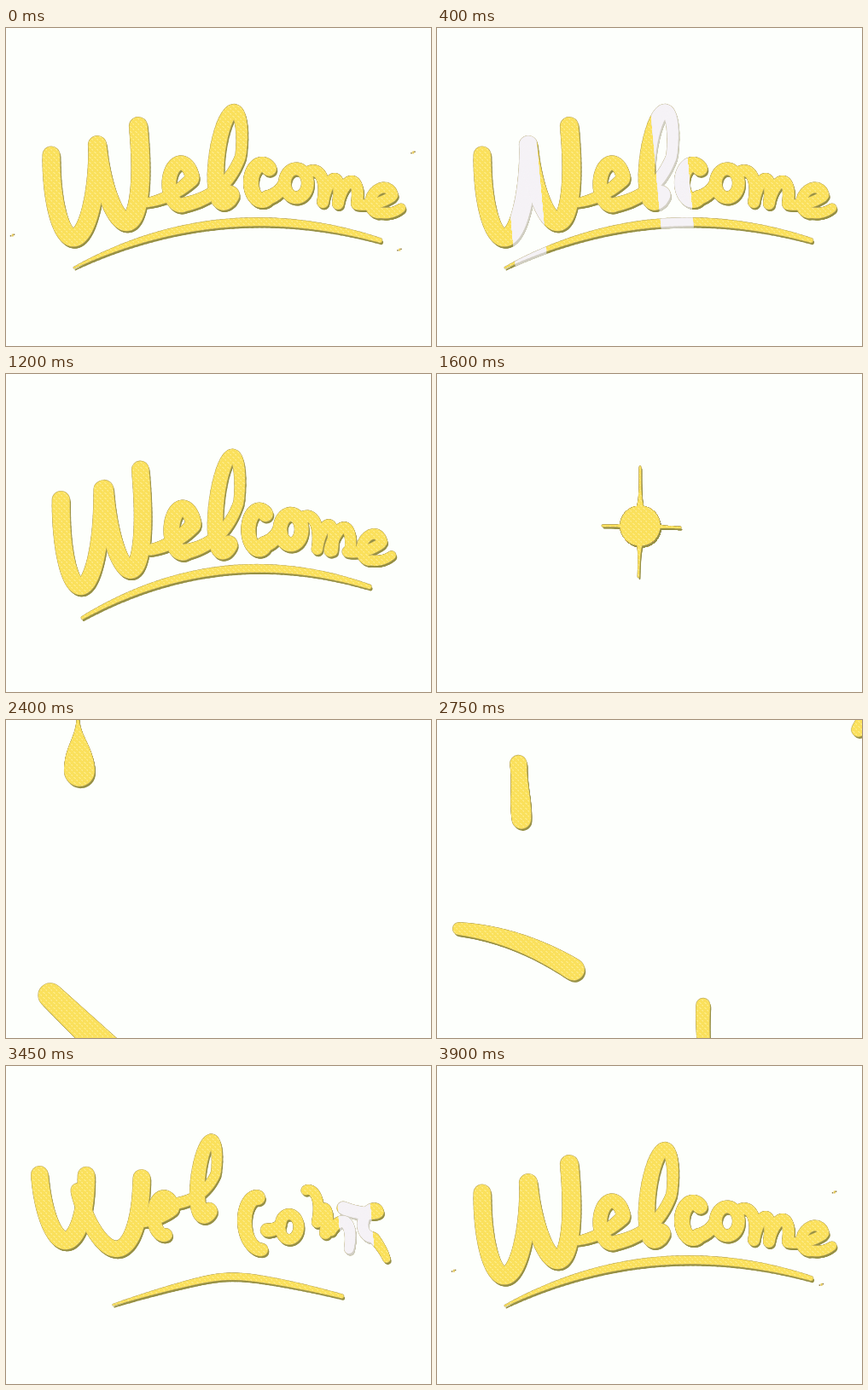
An HTML page with a canvas that plays this animation: 498x373 px, repeating every 3950 ms.

```html
<!DOCTYPE html>
<html lang="en">
<head>
<meta charset="utf-8">
<title>Welcome</title>
<style>
  html, body { margin: 0; width: 100%; height: 100%; overflow: hidden; background: #fdfffc; }
  canvas { display: block; }
</style>
</head>
<body>
<canvas id="stage" width="498" height="373" role="img" aria-label="Welcome"></canvas>
<script>
const LOOP = 3950, SAMPLES = 64, CENTER = { x: 249, y: 186 };
const ctx = document.getElementById('stage').getContext('2d');
ctx.lineCap = 'round';

const lerp = (a, b, k) => a + (b - a) * k;
const linear = k => k;
const smooth = k => k * k * (3 - 2 * k);
const easeOut = k => 1 - (1 - k) ** 2;
const backIn = k => k * k * (3.6 * k - 2.6);
const random = n => Math.abs(Math.sin(n * 127.1) * 43758.5) % 1;

// A brush maps u in 0..1 to [x, y, radius].
function swoosh(x1, y1, x2, y2, sag, r1, r2, belly = 0) {
  const dx = x2 - x1, dy = y2 - y1, length = Math.hypot(dx, dy);
  return u => {
    const bow = 4 * u * (1 - u);
    return [x1 + dx * u + dy / length * sag * bow,
            y1 + dy * u - dx / length * sag * bow,
            lerp(r1, r2, u) + belly * bow];
  };
}

// A U shape; negative depth makes an arch.
const cup = (x1, y1, x2, y2, depth, lean, r) => u => {
  const bow = Math.sin(Math.PI * u);
  return [lerp(x1, x2, smooth(u)) + lean * bow, lerp(y1, y2, u) + depth * bow ** .9, r];
};

// Part of a slanted ellipse, angles in degrees.
const bowl = (cx, cy, rx, ry, from, turn, r1, r2 = r1, slant = 0) => u => {
  const a = (from + turn * u) * Math.PI / 180, y = ry * Math.sin(a);
  return [cx + rx * Math.cos(a) - slant * y, cy + y, lerp(r1, r2, u)];
};

const join = (...parts) => u => {
  const i = Math.min(parts.length - 1, Math.floor(u * parts.length));
  return parts[i](u * parts.length - i);
};

// A bowl entered by a connecting stroke from (x, y).
function linked(x, y, sag, r, shape) {
  const [x2, y2, r2] = shape(0);
  return join(swoosh(x, y, x2, y2, sag, r, r2), shape);
}

const shift = (brush, dx, dy) => u => {
  const [x, y, r] = brush(u);
  return [x + dx, y + dy, r];
};
const ball = (x, y) => () => [x, y, 23];
const ray = (dx, dy) => u => [238 + dx * u, 178 + dy * u, .8 + 12 * (1 - u) ** 4];
const star = { body: ball(238, 178), up: ray(0, -69), down: ray(-2, 60), left: ray(-44, 0), right: ray(47, 2) };
const drop = u => [84 + 2 * u, -3 + 63 * u, 1 + 16.5 * smooth(u)];
const capsule = swoosh(52, 323, 145, 412, 0, 14, 18);

// Each stroke: its place in the word, its part of the star, its loose shape.
const strokes = [
  { // W, left half
    word: cup(53, 149, 107, 137, 103, 0, 10),
    part: star.left,
    loose: swoosh(-10, 49, 47, 96, 22, 9, 9, 1)
  },
  { // W, right half
    word: cup(107, 137, 155, 115, 101, 12, 10.5),
    part: star.left,
    loose: swoosh(3, 178, 173, 191, 16, 1, 8),
    early: capsule
  },
  { // e
    word: linked(164, 205, -5, 5, bowl(205, 183, 14, 25, -15, -270, 8)),
    part: star.body,
    loose: swoosh(105, 97, 110, 165, 0, 17, 5),
    early: drop
  },
  { // l
    word: linked(209, 207, -12, 8, bowl(261, 150, 14, 53, 0, -300, 6, 11, .12)),
    part: star.up,
    loose: swoosh(133, 0, 148, 77, 0, .8, 6)
  },
  { // c
    word: bowl(300, 181, 13, 21, -50, -250, 8.5),
    part: star.up,
    loose: swoosh(247, 116, 275, 274, -9, 8, 2.5, .8)
  },
  { // o
    word: linked(306, 199, -3, 8, bowl(340, 182, 13.5, 17, 180, 360, 7)),
    part: star.body,
    loose: swoosh(305, 169, 305, 227, 0, 6, .8)
  },
  { // m, first arches
    word: join(cup(352, 172, 371, 206, -18, 6, 6.5), cup(371, 206, 389, 206, -29, 5, 6.5)),
    part: star.right,
    loose: swoosh(348, 52, 321, 160, 6, .5, 8)
  },
  { // m, last arch
    word: cup(389, 206, 411, 206, -26, 5, 6.5),
    part: star.right,
    loose: swoosh(353, 150, 369, 246, 11, 1, .8, 5)
  },
  { // final e
    word: join(linked(411, 207, -4, 6, bowl(440, 202, 13, 15, -20, -270, 6, 6, .2)), swoosh(442, 217, 463, 211, -2, 6, 5)),
    part: star.right,
    loose: swoosh(338, 20, 384, 282, 31, 12, .5)
  },
  { // underline
    word: swoosh(80, 281, 438, 249, 36, .8, 2.5, 3),
    part: star.down,
    loose: u => [262 + 88 * Math.cos(5.6 * (u - .22)), 277 + 69 * u, .9]
  }
];

const sample = brush => Array.from({ length: SAMPLES }, (_, n) => brush(n / (SAMPLES - 1)));

function offstage(brush) {
  const [x, y] = brush(.5), dx = x - CENTER.x, dy = y - CENTER.y;
  const scale = 480 / Math.hypot(dx, dy);
  return shift(brush, dx * scale, dy * scale);
}

// Key: [time, brush, x easing, y easing], easing on the way to that key.
function timeline({ word, part, loose, early }) {
  let entry;
  if (early === drop) entry = [[2400, drop, smooth]];
  else if (early) entry = [[2201, shift(early, -80, 140)], [2400, early]];
  else entry = [[2201, offstage(loose)], [2420, offstage(loose)]];
  return [
    [0, word], [1130, word], [1600, part, smooth, backIn], [1650, part],
    [1880, ball(320, 244), smooth], [2200, ball(99, 22), smooth],
    ...entry,
    [3050, loose], [3800, word, easeOut], [LOOP, word]
  ].map(([time, brush, easeX = linear, easeY = easeX]) => ({ time, easeX, easeY, points: sample(brush) }));
}
const timelines = strokes.map(timeline);

function pose(keys, t) {
  const i = keys.findIndex(key => key.time > t), a = keys[i - 1], b = keys[i];
  const k = (t - a.time) / (b.time - a.time), ex = b.easeX(k), ey = b.easeY(k);
  return a.points.map(([x, y, r], n) => {
    const [x2, y2, r2] = b.points[n];
    return [lerp(x, x2, ex), lerp(y, y2, ey), lerp(r, r2, ex)];
  });
}

function weave() {
  const tile = document.createElement('canvas');
  tile.width = tile.height = 6;
  const c = tile.getContext('2d');
  c.fillStyle = '#fae05c';
  c.fillRect(0, 0, 6, 6);
  c.fillStyle = '#fdea83';
  for (let i = 0; i < 6; i++) if (i % 3) c.fillRect(i, i, 2, 1);
  return ctx.createPattern(tile, 'repeat');
}
const gold = { face: weave(), edge: '#c0ad5c', shade: '#969044' };
const white = { face: '#f5f2f6', edge: '#d5d0c4', shade: '#d0cec4' };

function paint(shapes, color, dx, dy, grow) {
  ctx.strokeStyle = color;
  for (const points of shapes) {
    for (let i = 1; i < points.length; i++) {
      const [x1, y1, r1] = points[i - 1], [x2, y2, r2] = points[i];
      ctx.lineWidth = r1 + r2 + grow * 2;
      ctx.beginPath();
      ctx.moveTo(x1 + dx, y1 + dy);
      ctx.lineTo(x2 + dx + .01, y2 + dy);
      ctx.stroke();
    }
  }
}

function emboss(shapes, { face, edge, shade }) {
  paint(shapes, shade, 1.5, 2.5, 0);
  paint(shapes, edge, 0, 0, .6);
  paint(shapes, face, 0, 0, 0);
}

// White bands sweep from left to right, each launched at its own time.
function drawShine(shapes, t) {
  for (const launch of [26, 276, 2887]) {
    const x = (t - launch) * .7, slant = .09, width = 38;
    if (x < -width || x > 498) continue;
    ctx.save();
    ctx.beginPath();
    const top = x - 232 * slant, bottom = top + 373 * slant;
    ctx.moveTo(top, 0);
    ctx.lineTo(top + width, 0);
    ctx.lineTo(bottom + width, 373);
    ctx.lineTo(bottom, 373);
    ctx.clip();
    emboss(shapes, white);
    ctx.restore();
  }
}

function drawScraps(t) {
  if (t < 2800 || t > 3350) return;
  const scale = 1 + (3050 - t) / 700;
  ctx.save();
  ctx.translate(CENTER.x, CENTER.y);
  ctx.scale(scale, scale);
  ctx.setLineDash([3, 8, 1, 5]);
  ctx.lineCap = 'butt';
  ctx.lineWidth = 1.2;
  ctx.strokeStyle = '#a6964f';
  ctx.beginPath();
  for (let i = 1; i < 7; i++) {
    const x = 190 * random(i), y = 220 * random(i + 20) - 100;
    ctx.moveTo(x, y);
    ctx.lineTo(x + 6 * random(i + 40), y + 25 + 40 * random(i + 60));
  }
  ctx.stroke();
  ctx.restore();
}

// Crumbs keep flying outwards across the loop point.
function drawCrumbs(t) {
  const age = t > LOOP / 2 ? t - LOOP : t, scale = 1 + age / 1000;
  if (age < -450 || age > 130) return;
  for (const [x, y] of [[8, 243], [477, 146], [461, 260]]) {
    const px = lerp(CENTER.x, x, scale), py = lerp(CENTER.y, y, scale);
    ctx.fillStyle = '#e6c955';
    ctx.fillRect(px - 1, py - 1.5, 2, 3);
    ctx.fillStyle = '#8f7b3d';
    ctx.fillRect(px - 3, py, 1.5, 1.5);
    ctx.fillRect(px + 1, py - 1.5, 1.5, 1.5);
  }
}

function draw(now) {
  const t = now % LOOP;
  ctx.fillStyle = '#fdfffc';
  ctx.fillRect(0, 0, 498, 373);
  const shapes = timelines.map(keys => pose(keys, t));
  drawScraps(t);
  emboss(shapes, gold);
  drawShine(shapes, t);
  drawCrumbs(t);
}

const start = performance.now();
function tick() {
  draw(performance.now() - start);
  requestAnimationFrame(tick);
}
tick();
</script>
</body>
</html>
```
